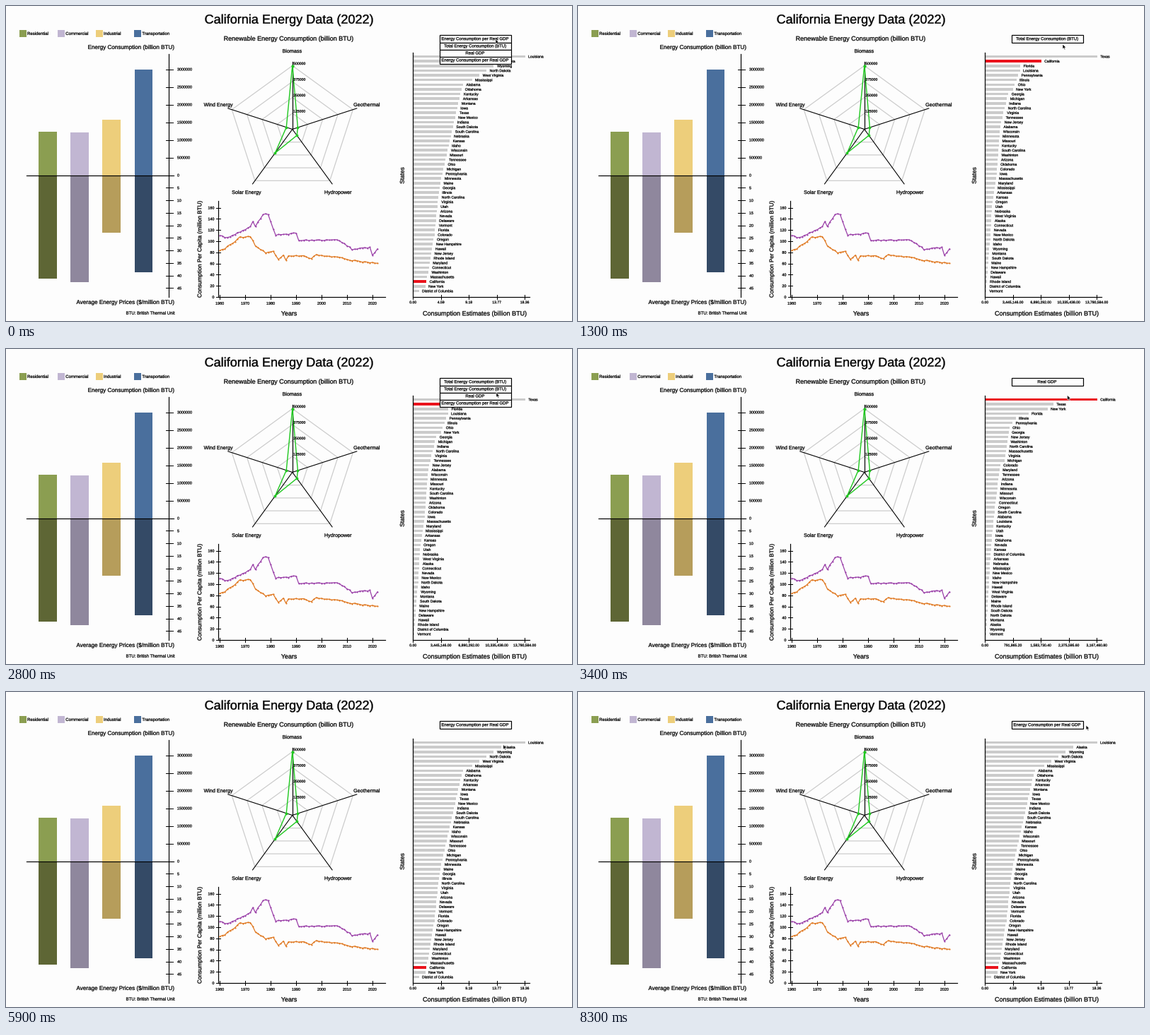
A matplotlib script for the animation above (8400 ms loop, 800x446 px).

```python
import numpy as np
import matplotlib.pyplot as plt
from matplotlib.animation import FuncAnimation
from matplotlib.patches import PathPatch, Polygon, Rectangle
from matplotlib.path import Path
from matplotlib.textpath import TextPath

W, H, DPI = 800, 446, 64
STEP, FRAMES = 100, 84
PT = 72 / DPI
SHIFT = 0.5
BG, GRAY, RED = "#fdfdfd", "#cbcbcb", "#ea121c"
FONT = {"family": "Liberation Sans"}

fig = plt.figure(figsize=(W / DPI, H / DPI), dpi=DPI, facecolor=BG)
ax = fig.add_axes([0, 0, 1, 1])
ax.set_xlim(SHIFT, W + SHIFT)
ax.set_ylim(H + SHIFT, SHIFT)
ax.axis("off")


def text(x, y, s, size, ha="left", z=5, vertical=False):
    """Slightly heavy lettering, aligned by its ink."""
    glyphs = TextPath((0, 0), s, size=size, prop=FONT)
    u, v = glyphs.vertices.T
    box = glyphs.get_extents()
    if vertical:
        verts = [x - v + (box.y0 + box.y1) / 2, y - u + (box.x0 + box.x1) / 2]
    else:
        anchor = {"left": box.x0, "right": box.x1,
                  "center": (box.x0 + box.x1) / 2}[ha]
        verts = [x + u - anchor, y + 0.36 * size - v]
    return ax.add_patch(PathPatch(
        Path(np.column_stack(verts), glyphs.codes), fc="black", ec="black",
        lw=(0.2 + 0.01 * size) * PT, joinstyle="round", zorder=z))


def line(xs, ys, color="black", width=1.2, z=3, **kw):
    return ax.plot(xs, ys, color=color, lw=width * PT, zorder=z, **kw)[0]


def rect(x0, y0, x1, y1, color, z=2, edge="none", width=0):
    return ax.add_patch(Rectangle((x0, y0), x1 - x0, y1 - y0, fc=color,
                                  ec=edge, lw=width * PT, zorder=z))


def follow(points, n):
    """Values at 0..n-1 on straight runs between (index, value) points."""
    return np.interp(np.arange(n), *np.array(points).T)


def stacked_bars():
    sectors = [
        ("Residential", "#8b9e51", "#5e6635", 178, 386),
        ("Commercial", "#c1b6d2", "#8f879d", 179, 391),
        ("Industrial", "#edce7b", "#b69d5b", 161, 321),
        ("Transportation", "#4a6f9d", "#344a66", 90, 377),
    ]
    for i, (name, light, dark, top, bottom) in enumerate(sectors):
        x = 19 + 54 * i
        rect(x, 34, x + 10.3, 44.5, light)
        text(x + 12, 39.3, name, 6.05)
        x = 46.7 + 45.1 * i
        rect(x, top, x + 25.3, 240, light)
        rect(x, 240, x + 25.3, bottom, dark)
    line([29, 237], [240.3, 240.3])
    line([230, 230], [68, 412.5])
    ticks = [(90 + 25 * i, 3000000 - 500000 * i) for i in range(7)]
    ticks += [(240.2 + 17.75 * i, 5 * i) for i in range(1, 10)]
    for y, value in ticks:
        line([226, 236.5], [y, y], width=1)
        text(242.7, y, str(value), 5.4)
    text(238, 58.5, "Energy Consumption (billion BTU)", 8.1, "right")
    text(238, 419.5, "Average Energy Prices ($/million BTU)", 8.1, "right")
    text(239, 435, "BTU: British Thermal Unit", 6.1, "right")


def radar():
    cx, cy = 405.3, 175
    angle = np.radians(72 * np.arange(6) - 90)

    def around(r):
        return cx + r * np.cos(angle), cy + r * np.sin(angle)

    for i in range(1, 5):
        line(*around(22.5 * i), GRAY, 1.2, 1)
        text(407, cy - 22.5 * i - 3.2, str(125000 * i), 5.1)
    for x, y in zip(*around(95.7)):
        line([cx, x], [cy, y], width=1.1, z=2)
    values = np.array([90, 8, 10.8, 41.5, 9, 90])
    line(*around(values), "#20c820", 1.4, 4, marker="o", ms=3.8 * PT, mew=0)
    text(405, 64, "Biomass", 7.2, "center")
    text(492, 140, "Geothermal", 7.15)
    text(451, 264, "Hydropower", 7.15)
    text(320, 264, "Solar Energy", 7.15)
    text(321, 140, "Wind Energy", 7.15, "right")
    text(400, 46.3, "Renewable Energy Consumption (billion BTU)", 9, "center")


def line_chart():
    upper = [(0, 324.5), (3, 329), (8, 320), (12, 313), (13, 305), (14, 312),
             (17, 295), (19, 295.5), (22, 325), (30, 322), (31, 332),
             (47, 332), (52, 345), (59, 342), (60, 353.5), (62, 343.5)]
    lower = [(0, 347), (2, 344), (8, 328), (12, 327), (14, 340), (18, 350),
             (21, 348), (23, 359), (25, 354), (26, 361), (27, 355),
             (33, 354), (36, 358), (38, 353), (49, 357.5), (52, 361),
             (62, 364.5)]
    rng = np.random.default_rng(4)
    years = 302.7 + 3.595 * np.arange(63)
    for points, color in ((upper, "#9a3fa8"), (lower, "#e07820")):
        ys = follow(points, 63) + rng.uniform(-1, 1, 63)
        line(years, ys, color, 1.25, 4, marker="o", ms=2.1 * PT, mew=0)
    line([300, 300], [276, 412.5])
    line([300, 536], [412.5, 412.5])
    for i in range(9):
        y = 412.5 - 15.8 * i
        line([297, 303], [y, y], width=1)
        text(294.7, y, str(20 * i), 5.4, "right")
    for i in range(7):
        x = 302.7 + 35.95 * i
        line([x, x], [409.5, 415.5], width=1)
        text(x, 421.3, str(1960 + 10 * i), 5.4, "center")
    text(274.6, 345, "Consumption Per Capita (million BTU)", 8.1,
         vertical=True)
    text(400.5, 435.5, "Years", 8.9, "center")


def ranking_axes():
    line([575.6, 575.6], [66, 412.5])
    line([575, 740], [412.5, 412.5])
    for i in range(5):
        x = 575.6 + 39.5 * i
        line([x, x], [409, 415.5], width=1)
    text(560.3, 240.5, "States", 8.3, vertical=True)
    text(663, 435.5, "Consumption Estimates (billion BTU)", 9, "center")


def ranking(title, names, points, unit):
    """One sorted bar list; points are (rank, label x) pairs."""
    parts = [text(663.5, 46.6, title, 6, "center", 8)]
    names = names.split(",")
    for i, (name, x) in enumerate(zip(names, follow(points, len(names)))):
        y = 72 + 6.64 * i
        color = RED if name == "California" else GRAY
        parts.append(rect(575.5, y - 1.8, x - 5, y + 1.8, color))
        parts.append(text(x, y, name, 5.05))
    for i in range(5):
        parts.append(text(575.7 + 39.5 * i, 419.8, f"{unit * i:,.2f}", 5.05,
                          "center"))
    return parts


text(400.5, 18.8, "California Energy Data (2022)", 18.07, "center")
stacked_bars()
radar()
line_chart()
ranking_axes()

OPTIONS = ["Total Energy Consumption (BTU)", "Real GDP",
           "Energy Consumption per Real GDP"]

TOTAL = ranking(
    OPTIONS[0],
    "Texas,California,Florida,Louisiana,Pennsylvania,Illinois,Ohio,New York,"
    "Georgia,Michigan,Indiana,North Carolina,Virginia,Tennessee,New Jersey,"
    "Alabama,Wisconsin,Minnesota,Missouri,Kentucky,South Carolina,Washinton,"
    "Arizona,Oklahoma,Colorado,Iowa,Massachusetts,Maryland,Mississippi,"
    "Arkansas,Kansas,Oregon,Utah,Nebraska,West Virginia,Alaska,Connecticut,"
    "Nevada,New Mexico,North Dakota,Idaho,Wyoming,Montana,South Dakota,Maine,"
    "New Hampshire,Delaware,Hawaii,Rhode Island,District of Columbia,Vermont",
    [(0, 739), (1, 660), (2, 630.5), (3, 630), (7, 620), (8, 613.5),
     (15, 602), (25, 597), (31, 591), (39, 588), (50, 582)],
    3445146)

GDP = ranking(
    OPTIONS[1],
    "California,Texas,New York,Florida,Illinois,Pennsylvania,Ohio,Georgia,"
    "New Jersey,Washinton,North Carolina,Massachusetts,Virginia,Michigan,"
    "Colorado,Maryland,Tennessee,Arizona,Indiana,Minnesota,Missouri,"
    "Wisconsin,Connecticut,Oregon,South Carolina,Alabama,Louisiana,Kentucky,"
    "Utah,Iowa,Oklahoma,Nevada,Kansas,District of Columbia,Arkansas,Nebraska,"
    "Mississippi,New Mexico,Idaho,New Hampshire,Hawaii,West Virginia,"
    "Delaware,Maine,Rhode Island,South Dakota,North Dakota,Montana,Alaska,"
    "Wyoming,Vermont",
    [(0, 739), (1, 677), (2, 669), (3, 642), (4, 624), (6, 615), (13, 608),
     (14, 602), (24, 594), (33, 588.5), (50, 582.5)],
    791865.2)

PER_GDP = ranking(
    OPTIONS[2],
    "Louisiana,Alaska,Wyoming,North Dakota,West Virginia,Mississippi,Alabama,"
    "Oklahoma,Kentucky,Arkansas,Montana,Iowa,Texas,New Mexico,Indiana,"
    "South Dakota,South Carolina,Nebraska,Kansas,Idaho,Wisconsin,Missouri,"
    "Tennessee,Ohio,Michigan,Pennsylvania,Minnesota,Maine,Georgia,Illinois,"
    "North Carolina,Virginia,Utah,Arizona,Nevada,Delaware,Vermont,Florida,"
    "Colorado,Oregon,New Hampshire,Hawaii,New Jersey,Rhode Island,Maryland,"
    "Connecticut,Washinton,Massachusetts,California,New York,"
    "District of Columbia",
    [(0, 739), (1, 705), (5, 664), (6, 651), (17, 634), (28, 618),
     (38, 611), (46, 602), (49, 598), (50, 589)],
    4.59)

VIEWS = [TOTAL, GDP, PER_GDP]

# Select box and its drop-down list
rect(613.5, 41.5, 714, 52, BG, 7, "black", 1.2)
menu = []
for i, option in enumerate(OPTIONS):
    y = 52 + 10 * i
    menu.append(rect(613.5, y, 714, y + 10, BG, 7, "black", 1.2))
    menu.append(text(663.5, y + 4.8, option, 6, "center", 8))

ARROW = np.array([(0, 0), (0, 6.6), (1.5, 5.3), (2.6, 7.7), (3.7, 7.2),
                  (2.6, 4.9), (4.7, 4.7)])
cursor = ax.add_patch(Polygon(ARROW, closed=True, fc="black", ec="white",
                              lw=0.5 * PT, zorder=10))

# Pointer moves: start ms, end ms, x, y reached
START = np.array([692.5, 47.5])
MOVES = [(0, 400, 684, 55.5), (1200, 1700, 698.7, 46.8),
         (2300, 3000, 692.2, 66), (3600, 4400, 703.4, 48.5),
         (5200, 5700, 703.4, 75), (6300, 6900, 718.6, 47.5)]


def pointer(t):
    pos = START
    for t0, t1, x, y in MOVES:
        u = np.clip((t - t0) / (t1 - t0), 0, 1)
        pos = pos + (np.array([x, y]) - pos) * u * u * (3 - 2 * u)
    return pos


def draw(k):
    t = k * STEP
    view = 0 if 400 <= t < 3200 else 1 if 3200 <= t < 5900 else 2
    is_open = t < 400 or 2300 <= t < 3200 or 5300 <= t < 5900
    for i, parts in enumerate(VIEWS):
        for part in parts:
            part.set_visible(i == view)
    for part in menu:
        part.set_visible(is_open)
    cursor.set_xy(ARROW + pointer(t))
    return []


anim = FuncAnimation(fig, draw, frames=FRAMES, interval=STEP, repeat=True,
                     repeat_delay=0, init_func=lambda: draw(0))
plt.show()
```
